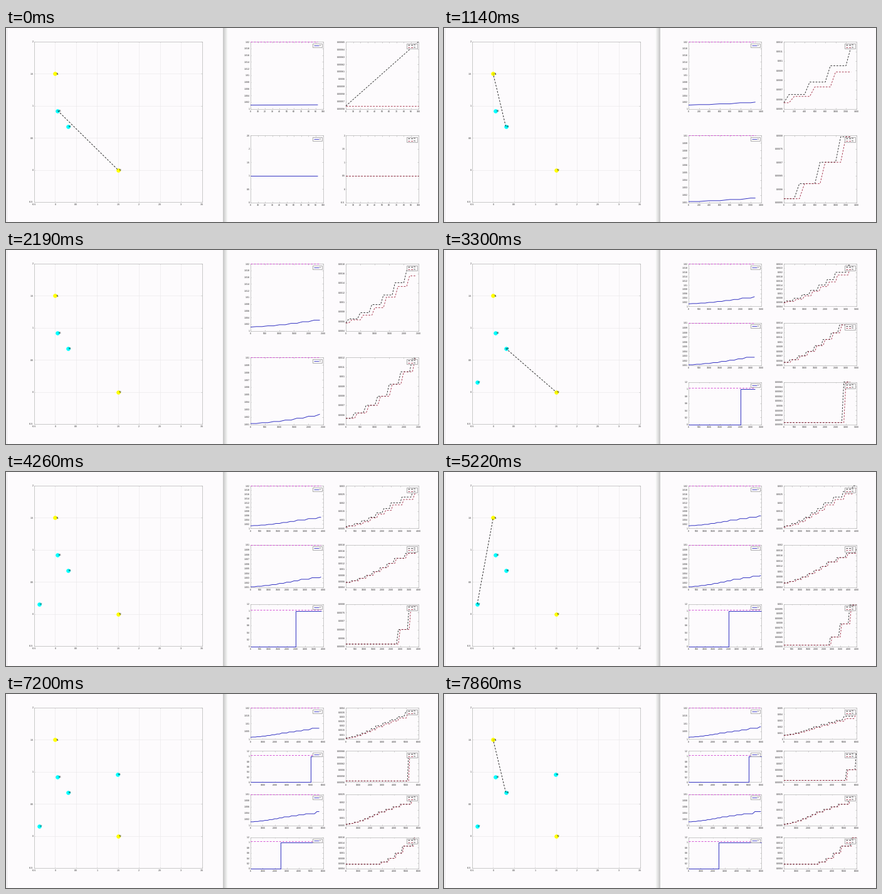
Write a matplotlib script that moves like this. It is 689x311 px and loops after 8000 ms.

```python
import math

import matplotlib.pyplot as plt
import numpy as np
from matplotlib.animation import FuncAnimation
from matplotlib.patches import Rectangle

W, H, DPI = 689, 311, 100
INTERVAL, FRAMES = 50, 160
PX = 72 / DPI
plt.rcParams["font.family"] = "Liberation Sans"
plt.rcParams["text.hinting"] = "no_hinting"

BACK, FRAME, GRID = "#fdfbfd", "#b4b4b4", "#ebe9eb"
BLUE, MAGENTA, RED, BLACK = "#2c2cc0", "#d040d0", "#a02840", "#1c1c1c"
DASH = (0, (3.2, 2.4))

fig = plt.figure(figsize=(W / DPI, H / DPI), dpi=DPI, facecolor=BACK)
stage = fig.add_axes([0, 0, 1, 1])
stage.axis("off")

TARGETS = {"T1": (0, 1.5), "T2": (1.5, 0)}
AGENTS = {"L5": (0.06, 0.925), "L6": (0.3, 0.68), "L7": (-0.38, 0.155), "L8": (1.49, 0.96)}
JOINED = {"L7": 25, "L8": 50}
LIMIT = {"L5": 1.02, "L6": 1.01, "L7": 1.04, "L8": 1.04}

# Weight (in thousandths) reached after a number of visits, for each target.
YOUNG = ([0, 1, 2, 3, 4, 5], [0.564, 0.65, 0.79, 0.99, 1.26, 1.58])
MIDDLE = ([0, 1, 2, 3, 4, 5, 6, 7, 10, 11],
          [0.564, 0.62, 0.7, 0.795, 0.92, 1.05, 1.19, 1.36, 1.85, 2.2])
OLD_FIRST = ([0, 1, 2, 3, 4, 6, 8, 10, 12, 13],
             [0.564, 0.65, 0.78, 0.95, 1.15, 1.66, 2.34, 3.0, 3.64, 4.1])
OLD_SECOND = ([0, 1, 2, 3, 6, 8, 10, 12], [0.564, 0.63, 0.73, 0.885, 1.55, 2.2, 2.85, 3.7])
GROWTH = {"L5": (OLD_FIRST, OLD_SECOND), "L6": (MIDDLE, MIDDLE),
          "L7": (YOUNG, YOUNG), "L8": (YOUNG, YOUNG)}
STEPS = 66


def order(step):
    if step < JOINED["L7"]:
        return ["L5", "L6"]
    return ["L5", "L6", "L7"] if step < JOINED["L8"] else ["L5", "L8", "L6", "L7"]


def pair(step):
    """Agent and target index visited in a step."""
    names = order(step + 1)
    base = {2: 0, 3: 24, 4: 49}[len(names)]
    turn = (step - base) % (2 * len(names))
    return names[turn // 2], turn % 2


def weights(name, target):
    visits = np.cumsum([0] + [pair(s) == (name, target) for s in range(STEPS)])
    return np.interp(visits, *GROWTH[name][target]) / 1000


WEIGHTS = {name: (weights(name, 0), weights(name, 1)) for name in AGENTS}


def clock(ms):
    return np.interp(ms, [0, 1100, 2150, 3300, 5200, 6350, 7850, 8000],
                     [1.95, 14.5, 25.1, 33.5, 46.5, 53.85, 61.5, 62.2])


def line(xs, ys, color, width, style="-", z=3):
    return stage.plot(xs, ys, color=color, lw=width * PX, ls=style, zorder=z,
                      solid_capstyle="butt", dash_capstyle="butt")[0]


def label(x, y, text, ha="center", size=3.6, color="#303030", z=4):
    return stage.text(x, y, text, ha=ha, va="center_baseline", fontsize=size * PX,
                      color=color, zorder=z)


def box(x, y, w, h, edge=FRAME, z=1):
    return stage.add_patch(Rectangle((x, y), w, h, fc=BACK, ec=edge, lw=0.7 * PX, zorder=z))


def ticks(low, high, small=False):
    """Rounded tick values around a data range."""
    span = high - low
    decade = 10.0 ** math.floor(math.log10(span) + 1e-9)
    sizes = [0.1, 0.2, 0.5, 1, 2]
    first = next(i for i, top in enumerate([1, 2, 5, 10]) if span / decade <= top + 1e-6)

    def spread(step):
        a = math.floor(round(low / step, 5))
        b = math.ceil(round(high / step, 5))
        return [round(i * step, 9) for i in range(a, b + 1)]

    values = spread(sizes[first] * decade)
    if small and len(values) > 8:
        values = spread(sizes[first + 1] * decade)
    return values


def frame_axes(x, y, w, h, xt, yt):
    """Box, tick marks and numbers; returns artists and the data-to-stage mappings."""
    def to_x(v):
        return x + (np.asarray(v) - xt[0]) / (xt[-1] - xt[0]) * w

    def to_y(v):
        return y + h - (np.asarray(v) - yt[0]) / (yt[-1] - yt[0]) * h

    artists = [box(x, y, w, h)]
    mx, my = [], []
    for v in xt:
        px = float(to_x(v))
        mx += [px, px, np.nan, px, px, np.nan]
        my += [y + h, y + h - 1.3, np.nan, y, y + 1.3, np.nan]
        artists.append(label(px, y + h + 4, f"{v:g}"))
    for v in yt:
        py = float(to_y(v))
        mx += [x, x + 1.3, np.nan, x + w, x + w - 1.3, np.nan]
        my += [py, py, np.nan, py, py, np.nan]
        artists.append(label(x - 1.5, py, f"{v:.6g}", "right"))
    artists.append(line(mx, my, FRAME, 0.6, z=2))
    return artists, to_x, to_y


def legend(right, top, entries):
    double = len(entries) > 1
    w, h = (17, 8.4) if double else (15, 6)
    x = right - w - 1.5
    artists = [box(x, top + 2.3, w, h, "#909090", z=5)]
    for i, (text, color, style) in enumerate(entries):
        y = top + (4.6 if double else 5.3) + 3.8 * i
        artists.append(line([x + 1.5, x + 9.5], [y, y], color, 0.85, style, z=6))
        artists.append(label(x + 11, y, text, "left", 3.4, z=6))
    return artists


def value_panel(name, n, top, h, xt, bare):
    steps = n // 100
    if name in JOINED:
        start = 100 * JOINED[name]
        xs = np.array([0, start, start, n])
        ys = np.array([0, 0, 1, 1])
    else:
        xs = np.minimum(100 * np.arange(steps + 1), n - 7)
        ys = 1 + sum(w[:steps + 1] for w in WEIGHTS[name])
    flat = np.ptp(ys) == 0
    bare = bare or flat
    high = ys.max() if bare else LIMIT[name]
    yt = [0, 0.5, 1, 1.5, 2, 2.5] if flat else ticks(ys.min(), high, h < 60)
    artists, to_x, to_y = frame_axes(390, top, 115.5, h, xt, yt)
    if not bare:
        artists.append(line(to_x([0, n - 7]), to_y([LIMIT[name]] * 2), MAGENTA, 0.9, DASH))
    artists.append(line(to_x(xs), to_y(ys), BLUE, 0.95))
    return artists + legend(505.5, top, [("V", BLUE, "-")])


def weight_panel(name, n, top, h, xt):
    steps = n // 100
    xs = 100 * np.arange(steps + 1)
    first, second = (w[:steps + 1] for w in WEIGHTS[name])
    if np.ptp(first) == 0:
        first = second = np.full(steps + 1, 0.5)
        yt = [-0.5, 0, 0.5, 1, 1.5, 2]
    else:
        yt = ticks(first.min(), first.max(), h < 60)
    artists, to_x, to_y = frame_axes(542, top, 115.5, h, xt, yt)
    artists.append(line(to_x(xs), to_y(first), BLACK, 0.85, DASH))
    artists.append(line(to_x(xs), to_y(second), RED, 0.85, DASH))
    return artists + legend(657.5, top, [("W", BLACK, DASH), ("W", RED, DASH)])


def draw_panels(done, fresh):
    n = 100 * done
    names = order(done)
    h = {2: 107.5, 3: 68, 4: 50}[len(names)]
    xt = ticks(0, n)
    artists = []
    for i, (name, top) in enumerate(zip(names, np.linspace(22.2, 279.7 - h, len(names)))):
        artists += value_panel(name, n, top, h, xt, fresh and i == 0)
        artists += weight_panel(name, n, top, h, xt)
    return artists


def shadow(left, shades):
    return stage.imshow([shades], extent=(left, left + len(shades), H, 0), cmap="gray",
                        vmin=0, vmax=1, aspect="auto", interpolation="nearest", zorder=0)


# Either window may lie in front and throw its shadow on the other.
fade = np.linspace(0.985, 0.8, 8) ** 1.1
shadow_left = shadow(337, fade)
shadow_right = shadow(346, fade[::-1])
line([0.5, 0.5], [0, H], "#e6e4e6", 1, z=0)
stage.set_xlim(0, W)
stage.set_ylim(H, 0)

# Map
_, map_x, map_y = frame_axes(45, 22, 267.5, 257, np.arange(-0.5, 3.6, 0.5),
                             np.arange(-0.5, 2.1, 0.5))
for gx in np.arange(0, 3.1, 0.5):
    line(map_x([gx, gx]), [22, 279], GRID, 0.7, z=1.5)
for gy in np.arange(0, 1.6, 0.5):
    line([45, 312.5], map_y([gy, gy]), GRID, 0.7, z=1.5)

nodes = {}
for name, (x, y) in {**TARGETS, **AGENTS}.items():
    color = "#ffff00" if name in TARGETS else "#00ffff"
    px, py = float(map_x(x)), float(map_y(y))
    dot = stage.plot(px, py, "o", ms=6.6 * PX, mfc=color, mec="none", zorder=3)[0]
    nodes[name] = (dot, label(px + 1, py, name, "left", 4, "black", 5))
link = line([], [], BLACK, 0.9, DASH, z=4)

panels = {"key": None, "artists": []}


def update(i):
    now = clock(i * INTERVAL)
    step, shown = int(now), now - 0.8
    done = int(shown)

    key = (done, shown - done < 0.1)
    if key != panels["key"]:
        for artist in panels["artists"]:
            artist.remove()
        panels.update(key=key, artists=draw_panels(*key))

    plotting = shown - done < 0.4
    shadow_right.set_visible(plotting)
    shadow_left.set_visible(not plotting)

    for name, start in JOINED.items():
        for artist in nodes[name]:
            artist.set_visible(done >= start)

    agent, target = pair(step)
    ends = [AGENTS[agent], list(TARGETS.values())[target]]
    link.set_data(map_x([p[0] for p in ends]), map_y([p[1] for p in ends]))
    link.set_visible(now - step >= 0.2 and done >= JOINED.get(agent, 0))
    return []


anim = FuncAnimation(fig, update, frames=FRAMES, interval=INTERVAL, repeat=True, repeat_delay=0)
plt.show()
```
